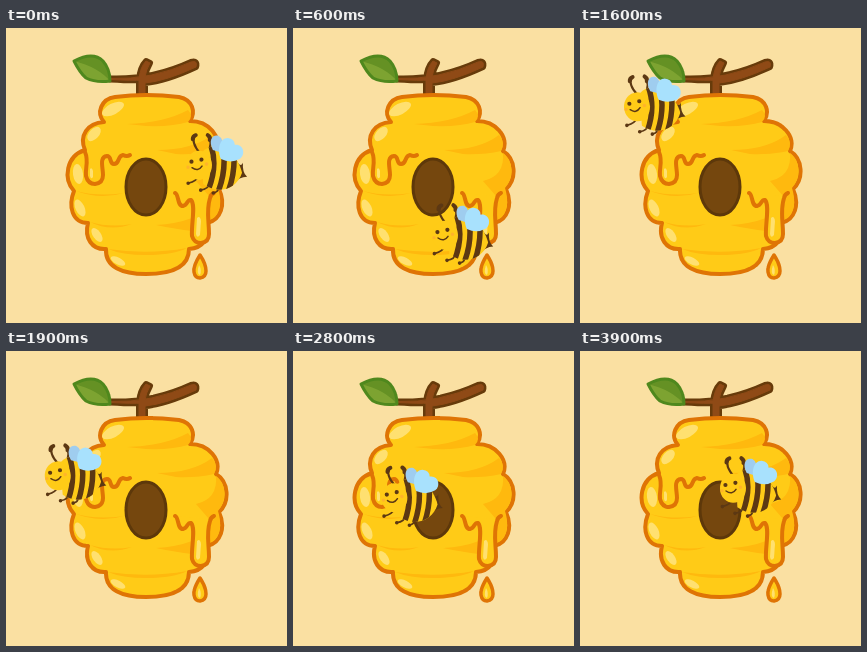
An HTML page that plays this animation: 281x295 px, repeating every 4 s.

```html
<!DOCTYPE html>
<html lang="en">
<head>
<meta charset="utf-8">
<title>Bee and hive</title>
<style>
  html, body { margin: 0; width: 100%; height: 100%; overflow: hidden; background: #fae0a2; }
  svg { display: block; width: 100vw; height: 100vh; }
  path { stroke-linecap: round; stroke-linejoin: round; }
  .honey { fill: #ffcb17; }
  .rim { stroke: #df7405; stroke-width: 4; }
  .line { fill: none; }
  .shade { fill: #ffb90e; }
  .shine { fill: #ffe070; }
  .brown { stroke: #5c3813; }
</style>
</head>
<body>
<svg viewBox="0 0 281 295">
  <defs>
    <path id="branch" d="M104 50.500Q146 52 185 34Q192 32 190 39Q160 53 139 55V68H133V52Q134 39 140 33L144 35Q140 42 139 49Q150 54 104 51.500Z"/>
    <clipPath id="body"><path d="M196 124C209 111 230 121 236 145C230 162 212 167 197 156Z"/></clipPath>
  </defs>

  <use href="#branch" fill="none" stroke="#673b0a" stroke-width="6"/>
  <use href="#branch" fill="#8f4a16" stroke="#8f4a16" stroke-width="1"/>
  <path d="M68 33Q87 23 97 33Q104 41 104 53Q90 55 80 50Q74 45 68 33Z" fill="#7da331"/>
  <path d="M68 33Q87 23 97 33Q104 41 104 53Q92 39 68 33Z" fill="#659124"/>
  <path class="line" d="M68 33Q87 23 97 33Q104 41 104 53Q90 55 80 50Q74 45 68 33Z" stroke="#4f881d" stroke-width="3"/>

  <path class="honey rim" d="M98 94C90 85 95 71 109 69Q140 65 173 69C187 72 190 84 184 93
    C203 93 216 109 210 123C223 131 224 151 213 161C220 176 215 192 201 195
    C204 210 197 220 183 221C183 240 164 246 140 246C116 246 99 239 100 221
    C86 222 78 210 82 195C66 195 62 178 68 163C57 151 60 128 79 122C73 108 81 95 98 94Z"/>
  <g class="shade">
    <path d="M121 96Q158 95 182 82Q188 88 182 94Q166 99 140 98Z"/>
    <path d="M151 122Q186 122 206 107Q213 115 208 123Q190 127 170 126Z"/>
    <path d="M210 125C221 133 221 150 212 160C217 176 213 190 203 192V168L190 153Q212 148 210 125Z"/>
    <path d="M70 163Q92 169 118 165Q94 172 70 163Z"/>
    <path d="M84 194Q104 200 126 196Q104 204 84 194Z"/>
    <path d="M150 197Q170 196 186 190V203Q170 201 150 197Z"/>
    <path d="M102 221Q142 227 181 220Q168 227 140 227Q116 227 102 221Z"/>
  </g>
  <g class="shine">
    <ellipse cx="107" cy="81" rx="12" ry="5.500" transform="rotate(-27 107 81)"/>
    <ellipse cx="88" cy="106" rx="8.500" ry="5" transform="rotate(-48 88 106)"/>
    <ellipse cx="72" cy="146" rx="5" ry="10" transform="rotate(-8 72 146)"/>
    <ellipse cx="74" cy="180" rx="4.500" ry="9" transform="rotate(-25 74 180)"/>
    <ellipse cx="91" cy="207" rx="4" ry="8" transform="rotate(-35 91 207)"/>
    <ellipse cx="112" cy="233" rx="8" ry="3.500" transform="rotate(28 112 233)"/>
  </g>

  <ellipse cx="140" cy="159" rx="20" ry="28" fill="#75470e" stroke="#5d380a" stroke-width="3"/>

  <path class="honey rim" style="fill:none" d="M79 124C83 133 79 140 80 148Q82 156 89 156Q97 155 97 147
    C97 139 93 129 101 128C106 128 103 136 108 136C114 136 111 128 117 127Q121 129 124 127"/>
  <path class="shine" d="M84 141Q86 139 87 143V149Q85 152 84 148Z"/>

  <path class="honey" d="M170 165C171 180 181 177 183 172C190 173 185 197 186 208Q188 215 195 215Q203 214 203 206C203 192 200 183 204 168Z"/>
  <path class="rim line" d="M169 165C173 166 171 178 177 178C182 177 181 171 185 172
    C190 177 185 197 186 208Q188 215 195 215Q203 214 203 206C203 192 200 183 204 170Q205 166 208 165"/>
  <path class="shine" d="M191 190Q194 187 195 193L194 207Q191 211 190 206Z"/>
  <path class="honey rim" style="stroke-width:3.500" d="M194 227Q187 238 188 244Q189 250 194 250Q200 249 200 243Q200 236 194 227Z"/>
  <path class="shine" d="M193 237Q196 242 194 247Q190 246 193 237Z"/>

  <g id="bee">
    <g class="brown line" stroke-width="1.700">
      <path d="M192 148Q191 153 182 155M203 155Q203 161 194 162M210 157Q215 163 207 165"/>
      <path d="M194 125Q185 114 189 108M202 124Q207 115 203 109" stroke-width="2.200"/>
      <path d="M187 111Q187 108 190 107M204 112Q205 109 202 107" stroke-width="4"/>
    </g>
    <path d="M230 131Q234 141 237 135Q236 145 241 149Q233 149 227 156Z" fill="#5c3813"/>
    <g clip-path="url(#body)">
      <path class="honey" d="M190 110H245V170H190Z"/>
      <path class="brown line" stroke-width="5.500" d="M205 117Q212 138 202 162M216 115Q222 140 211 166M227 117Q231 142 221 166"/>
    </g>
    <ellipse class="honey" cx="193" cy="137" rx="13" ry="14.500"/>
    <g fill="#5c3813">
      <circle cx="185.500" cy="133.500" r="2.100"/>
      <circle cx="195.500" cy="131.500" r="2.100"/>
      <circle cx="182" cy="155" r="1.800"/>
      <circle cx="194.500" cy="162" r="1.800"/>
      <circle cx="207" cy="165" r="1.800"/>
    </g>
    <path class="brown line" d="M186 139.500Q192 144 196 138" stroke-width="1.500"/>
    <g fill="#ffb42a">
      <circle cx="182" cy="139" r="1.700"/>
      <circle cx="200.500" cy="136" r="1.800"/>
    </g>
    <path d="M207 122C202 112 207 106 213 108Q219 111 217 125Z" fill="#9fcdef"/>
    <path d="M215 131C211 121 214 110 222 110Q229 111 229 117C238 116 240 127 234 131Q225 136 215 131Z" fill="#a8e1fd"/>
  </g>
</svg>
<script>
  const LOOP = 4000, STEP = 100;
  // [step, x, y]: waypoints of the flight, relative to the drawn pose
  const path = [
    [0, 0, 0], [3, -6, 45], [5, -25, 74], [6, -41, 70], [11, -97, -27], [12, -106, -45],
    [15, -130, -64], [16, -136, -59], [18, -143, -29], [23, -128, 50], [24, -123, 54],
    [30, -76, -14], [33, -55, -43], [34, -50, -46], [36, -43, -39], [39, -40, 0]
  ];
  const bee = document.getElementById("bee");

  function slope(i, axis) {
    const a = path[Math.max(i - 1, 0)], b = path[Math.min(i + 1, path.length - 1)];
    return (b[axis] - a[axis]) / (b[0] - a[0]);
  }

  // Cubic Hermite curve through the waypoints
  function along(step, axis) {
    const next = Math.max(1, path.findIndex(p => p[0] >= step)), i = next - 1;
    const a = path[i], b = path[next], span = b[0] - a[0];
    const u = (step - a[0]) / span, v = 1 - u;
    return a[axis] * v * v * (1 + 2 * u) + b[axis] * u * u * (1 + 2 * v)
      + span * u * v * (slope(i, axis) * v - slope(next, axis) * u);
  }

  function draw() {
    const step = Math.floor(performance.now() % LOOP / STEP);
    const x = along(step, 1), y = along(step, 2);
    bee.setAttribute("transform", `translate(${x} ${y}) rotate(${x / 60 - 0.5} 211 137)`);
    requestAnimationFrame(draw);
  }
  draw();
</script>
</body>
</html>
```
